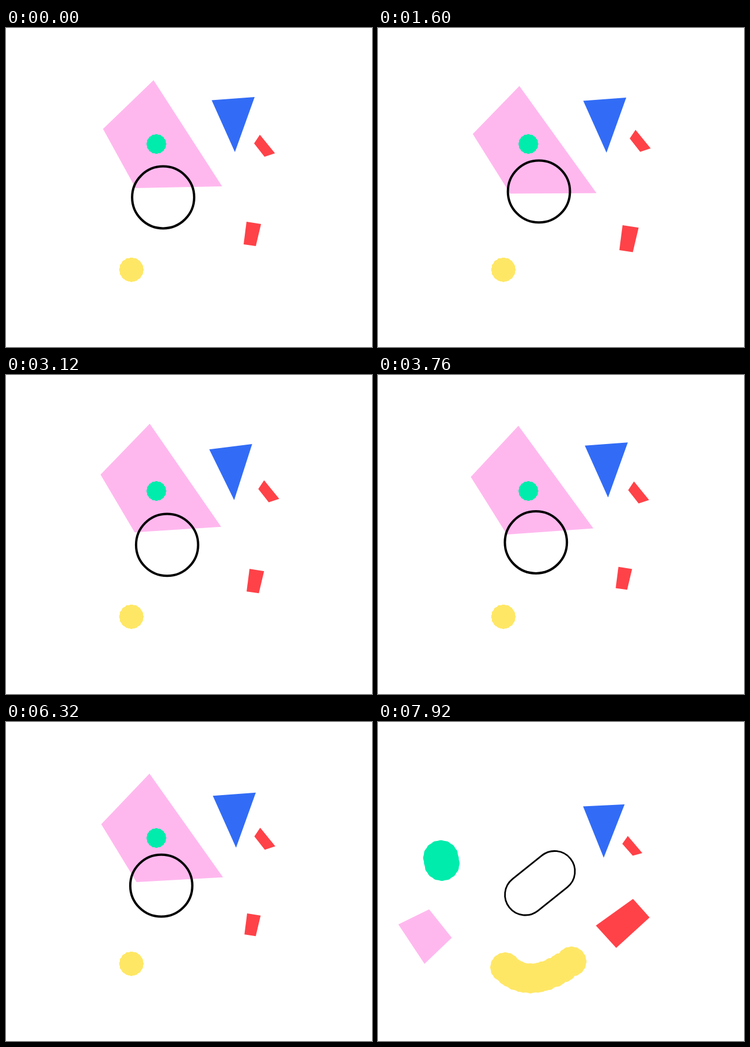
An HTML page with a canvas that plays this animation: 630x550 px, repeating every 8 s.

```html
<!DOCTYPE html>
<html lang="en">
<head>
<meta charset="utf-8">
<title>Shapes</title>
<style>
html, body { margin: 0; width: 100%; height: 100%; overflow: hidden; background: #fff; }
canvas { display: block; }
</style>
</head>
<body>
<canvas id="stage" width="630" height="550"></canvas>
<script>
const ctx = document.getElementById('stage').getContext('2d');
const LOOP = 8000;
const STEP = 80;
const MOVE = { start: 7120, length: 800 };
const TIMES = [0, 1600, 2480, 3760, 5040, 6320, 7600];
const REST = [0, 0];

// path: how far the shape has drifted at each time, as dx, dy, lean, tilt.
// lean shears x along y, tilt shears y along x.
const pink = {
  color: '#ffb8ee', back: 3.2,
  from: [254, 90, 372, 273, 223, 276, 167, 174],
  end: [88, 323, 127, 372, 80, 417, 35, 349],
  path: [REST, [-1.5, 10, 0.081, 0.015], [-0.7, -6.7, 0, -0.025],
    [-5.5, -2.5, 0.06, -0.05], [1.5, 2.4, 0.025, -0.005], [-1.7, -1, 0.047, -0.036]]
};
const blue = {
  color: '#326cf6', back: 1.3,
  from: [354, 124.5, 428, 119, 394, 214],
  end: [353, 145.5, 424.5, 142, 388.5, 234],
  path: [REST, [-0.7, 1], [-8, 6, 0.057, -0.09], [2, -2.7], [-1.2, -0.5], [2, 2.8]]
};
const chip = {
  color: '#ff4248', back: 1.3,
  from: [437, 184, 463, 216, 445, 222, 427, 199],
  end: [430, 196.5, 455, 226, 438.5, 230.5, 420.5, 210],
  path: [REST, [6.3, -8.6], [9.7, -5], [3.6, -0.6], [-3.1, -2.3], [0.5, -1.8]]
};
const block = {
  color: '#ff4248', back: 1.3, grow: 0.013,
  from: [414, 334, 439, 338, 430, 376, 409, 373],
  end: [439, 305, 467.5, 337, 410, 389.5, 375, 351],
  path: [REST, [7.9, 8.2], [11, 5.5], [-0.7, -4.5], [0, -6.2], [0.4, -5.4]]
};
const ring = {
  back: 1.3, width: [4, 2.8], radius: [53.4, 35],
  from: [270.5, 292, 270.5, 292],
  end: [304, 257.5, 253.5, 298],
  path: [REST, [6.5, -10.1], [11, 3.1], [1.3, -3.5], [-5.5, -7.3], [-3.2, -9.8]]
};
// Trails run from a dot to a curve: start, control, end.
const yellow = {
  color: '#ffe766', back: 1.3, radius: [20.3, 25.6], dots: 10,
  from: [215.8, 416.7, 215.8, 416.7, 215.8, 416.7],
  end: [219, 423, 261, 465.5, 333, 413]
};
const green = {
  color: '#00ecac', back: 1.3, radius: [16.6, 30.2], dots: 2,
  from: [258.8, 200, 258.8, 200, 258.8, 200],
  end: [108.2, 234.3, 109, 239, 110, 243.5]
};

const lerp = (a, b, k) => a + (b - a) * k;

function backInOut(x, s) {
  const half = y => y * y * ((s + 1) * y - s) / 2;
  return x < 0.5 ? half(2 * x) : 1 - half(2 - 2 * x);
}

function progress(shape, t) {
  const x = Math.min(1, Math.max(0, (t - MOVE.start) / MOVE.length));
  return backInOut(x, shape.back);
}

// Smooth curve through the path, heading back one stop at the end
function drift(path, t) {
  const last = TIMES.length - 1;
  const key = (i, n) => path[i === last ? last - 2 : i][n] || 0;
  const i = TIMES.findLastIndex((start, n) => n < last && t >= start);
  const span = TIMES[i + 1] - TIMES[i];
  const x = Math.min(1, (t - TIMES[i]) / span);
  const u = i ? x : x ** 1.6;
  const v = 1 - u;
  const slope = (j, n) => j === 0 || j === last ? 0 :
    (key(j + 1, n) - key(j - 1, n)) / (TIMES[j + 1] - TIMES[j - 1]) * span;
  return [0, 1, 2, 3].map(n =>
    key(i, n) * v * v * (1 + 2 * u) + key(i + 1, n) * u * u * (3 - 2 * u) +
    slope(i, n) * u * v * v - slope(i + 1, n) * u * u * v);
}

function points(shape, t) {
  const { from, end, path, grow = 0 } = shape;
  const [dx, dy, lean, tilt] = path ? drift(path, t) : [0, 0, 0, 0];
  const k = progress(shape, t);
  const size = 1 + grow * dy;
  const count = from.length / 2;
  const mean = axis => from.reduce((sum, v, i) => i % 2 === axis ? sum + v : sum, 0) / count;
  const cx = mean(0), cy = mean(1);
  return Array.from({ length: count }, (_, i) => {
    const x = from[2 * i] - cx, y = from[2 * i + 1] - cy;
    return [
      lerp(cx + dx + size * x + lean * y, end[2 * i], k),
      lerp(cy + dy + size * y + tilt * x, end[2 * i + 1], k)
    ];
  });
}

function polygon(shape, t) {
  ctx.fillStyle = shape.color;
  ctx.beginPath();
  for (const [x, y] of points(shape, t)) ctx.lineTo(x, y);
  ctx.fill();
}

// A dot with a slightly scalloped edge
function dot(x, y, r) {
  ctx.beginPath();
  for (let i = 0; i < 96; i++) {
    const w = i * Math.PI / 48, d = r + 0.35 * Math.cos(16 * w);
    ctx.lineTo(x + d * Math.cos(w), y + d * Math.sin(w));
  }
  ctx.fill();
}

function trail(shape, t) {
  const [a, c, b] = points(shape, t);
  const r = lerp(...shape.radius, progress(shape, t));
  const at = (n, u) => lerp(lerp(a[n], c[n], u), lerp(c[n], b[n], u), u);
  ctx.fillStyle = shape.color;
  for (let i = 0; i < shape.dots; i++) {
    const u = i / (shape.dots - 1);
    dot(at(0, u), at(1, u), r);
  }
}

function capsule(shape, t) {
  const [[ax, ay], [bx, by]] = points(shape, t);
  const k = progress(shape, t);
  const r = lerp(...shape.radius, k);
  const w = Math.atan2(by - ay, bx - ax), q = Math.PI / 2;
  ctx.lineWidth = lerp(...shape.width, k);
  ctx.strokeStyle = '#000';
  ctx.beginPath();
  ctx.arc(ax, ay, r, w + q, w + 3 * q);
  ctx.arc(bx, by, r, w - q, w + q);
  ctx.closePath();
  ctx.stroke();
}

function draw(now) {
  const t = Math.floor((now % LOOP) / STEP) * STEP;
  ctx.fillStyle = '#fff';
  ctx.fillRect(0, 0, 630, 550);
  for (const shape of [pink, blue, chip, block]) polygon(shape, t);
  trail(yellow, t);
  trail(green, t);
  capsule(ring, t);
}

let origin;
function tick(now) {
  origin ??= now;
  draw(now - origin);
  requestAnimationFrame(tick);
}
draw(0);
requestAnimationFrame(tick);
</script>
</body>
</html>
```
